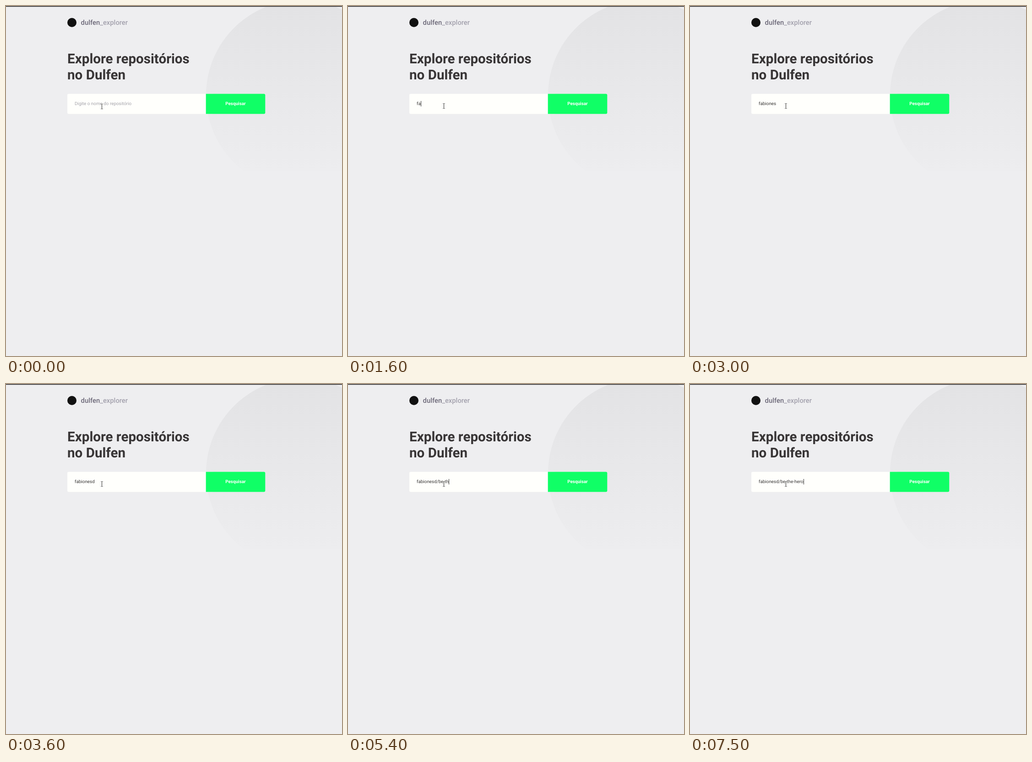
Animation of 734 by 763 pixels, one loop 8000 ms. Source, as an HTML page:

```html
<!DOCTYPE html>
<html lang="pt-BR">
<head>
<meta charset="utf-8">
<title>Explore repositórios</title>
<style>
  html, body { margin: 0; width: 100%; height: 100%; overflow: hidden; background: #eeeef0; }
  svg { display: block; width: 734px; height: 763px; }
  text { font-family: Roboto, "Liberation Sans", sans-serif; text-rendering: geometricPrecision; }
  .brand { font-size: 14.8px; font-weight: 500; fill: #6c6878; }
  .brand .soft { fill: #a3a1ad; }
  .title { font-size: 29.6px; font-weight: 700; fill: #383536; }
  .field { font-size: 9.9px; fill: #3a3838; }
  .hint { fill: #a5a4ab; }
  .label { font-size: 9.9px; font-weight: 700; fill: #fff; text-anchor: middle; }
</style>
</head>
<body>
<svg viewBox="0 0 734 763">
  <defs>
    <linearGradient id="fade" gradientUnits="userSpaceOnUse" x1="0" y1="2" x2="0" y2="360">
      <stop offset="0" stop-color="#e3e3e5"/>
      <stop offset="1" stop-color="#ededef"/>
    </linearGradient>
    <clipPath id="banner"><rect y="2" width="734" height="358"/></clipPath>
  </defs>

  <rect width="734" height="763" fill="#eeeef0"/>
  <circle cx="644" cy="194.5" r="207" fill="url(#fade)" clip-path="url(#banner)"/>
  <rect width="734" height="1.6" fill="#333132"/>

  <circle cx="144" cy="36" r="10" fill="#111"/>
  <text class="brand" x="163.6" y="41.2">dulfen<tspan class="soft">_explorer</tspan></text>

  <text class="title" x="134" y="125">Explore repositórios</text>
  <text class="title" x="134" y="159.6">no Dulfen</text>

  <rect x="134" y="191.5" width="320" height="43.8" rx="3" fill="#fffffc"/>
  <path d="M436.7 191.5H563.3a3 3 0 0 1 3 3V232.3a3 3 0 0 1-3 3H436.7Z" fill="#10ff66"/>
  <text class="label" x="501.4" y="216.3">Pesquisar</text>

  <text class="field hint" id="hint" x="150" y="216.3">Digite o nome do repositório</text>
  <text class="field" id="typed" x="150" y="216.3"></text>
  <rect id="caret" y="207" width="1" height="12" fill="#333"/>

  <g id="pointer" fill="none">
    <path d="M207.5 212.5H212M209.5 213V223M207.5 223.5H212" stroke="#fffffc" stroke-width="3"/>
    <path d="M207.5 212.5H209M210 212.5H211.5M209.5 213V223M207.5 223.5H209M210 223.5H211.5" stroke="#2b2b2b"/>
  </g>
</svg>
<script>
  const LOOP = 8000;
  const FOCUS = 400;
  const CARET_HOLD = 500;
  const QUERY = "fabionesd/be-the-hero";

  // Moment of each keystroke, in tenths of a second.
  const KEYS = [15, 16, 18, 20, 21, 22, 24, 25, 31, 39, 43,
                45, 49, 52, 54, 55, 63, 70, 71, 73, 75].map(k => k * 100);

  const [hint, typed, caret, pointer] =
    ["hint", "typed", "caret", "pointer"].map(id => document.getElementById(id));
  const show = (el, on) => el.setAttribute("visibility", on ? "visible" : "hidden");

  function draw(time) {
    const focused = time >= FOCUS;
    const count = KEYS.filter(key => key <= time).length;
    const lastInput = count ? KEYS[count - 1] : FOCUS;

    typed.textContent = QUERY.slice(0, count);
    caret.setAttribute("x", Math.ceil(150 + typed.getComputedTextLength()));
    show(hint, !count);
    show(caret, focused && time - lastInput < CARET_HOLD);
    pointer.setAttribute("transform", `translate(0 ${focused ? 0 : 1})`);
  }

  const start = performance.now();
  function tick() {
    draw((performance.now() - start) % LOOP);
    requestAnimationFrame(tick);
  }
  tick();
</script>
</body>
</html>
```
